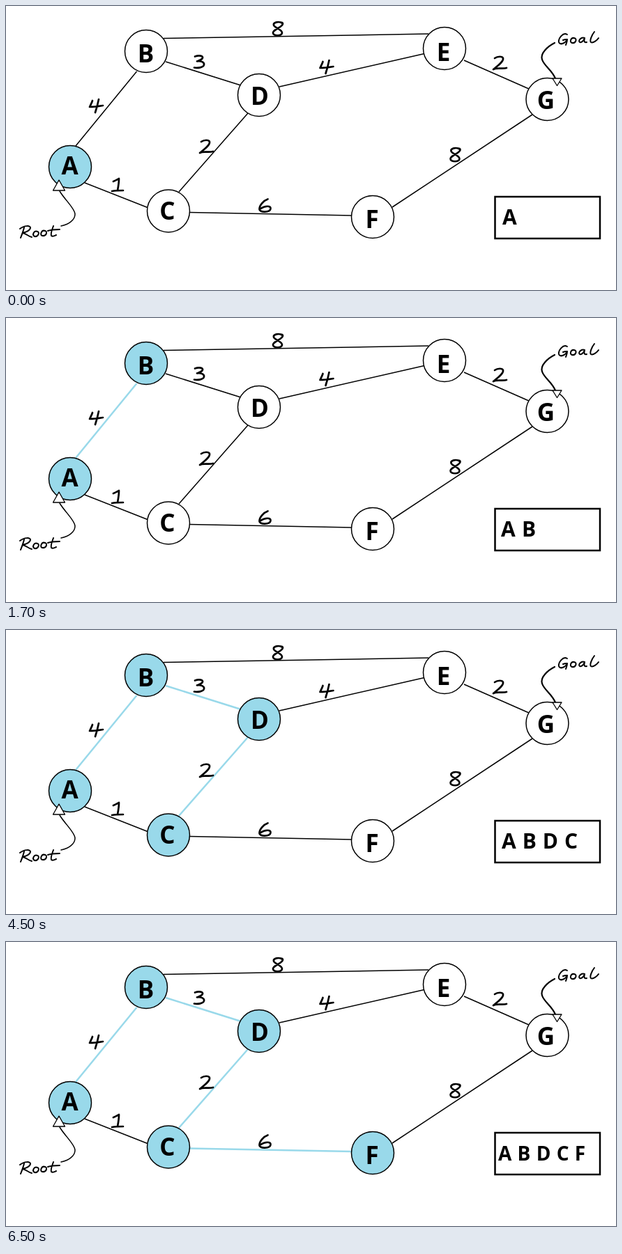
These frames come from a looping animation (875x408 px, 8 s). An HTML page:

```html
<!DOCTYPE html>
<html lang="en">
<head>
<meta charset="utf-8">
<title>Graph search</title>
<style>
  html, body { margin: 0; width: 100%; height: 100%; overflow: hidden; background: #fff; }
  svg { display: block; width: 100%; height: 100%; }
  text { font-family: "Open Sans", "Noto Sans", sans-serif; font-weight: 700; white-space: pre; }
  .ink { fill: none; stroke: #000; stroke-linecap: round; stroke-linejoin: round; }
</style>
</head>
<body>
<svg id="stage" viewBox="0 0 875 408"></svg>
<script>
const BLUE = '#99d9ea';
const LOOP = 8000;
const stage = document.getElementById('stage');

function add(tag, attrs, text) {
  const el = document.createElementNS('http://www.w3.org/2000/svg', tag);
  for (const key in attrs) el.setAttribute(key, attrs[key]);
  if (text) el.textContent = text;
  return stage.appendChild(el);
}

// Circle centre, then letter centre.
const nodes = {
  A: [92, 231, 91.5, 229], B: [201, 65, 200.5, 68], C: [233, 294.5, 231.5, 294.5],
  D: [363, 128, 364, 129], E: [629, 61, 627.5, 66], F: [526, 303, 525, 306],
  G: [776.5, 134, 774.5, 135]
};

// Line ends, then the weight and its centre.
const edges = {
  AB: [100, 201, 187.5, 94, 4, 129, 143],
  BE: [226, 46.5, 606, 40, 8, 390, 32.5],
  BD: [229, 80, 337, 114, 3, 277, 80.5],
  DE: [392, 116, 600, 68.5, 4, 459.5, 87],
  EG: [657, 78, 750, 119, 2, 708, 82],
  DC: [347, 154, 248, 267, 2, 287, 202],
  AC: [113, 254, 203, 289.5, 1, 160, 257],
  CF: [263, 296.5, 497, 301, 6, 371.5, 286.5],
  FG: [554, 289, 755, 156, 8, 644.5, 213.5]
};

// Handwritten digits around their own centre.
const digits = {
  1: 'M-6-5C-3-6 0-8 2-9C2-3 1 3 0 8M-8 9C-3 8 4 8 8 8',
  2: 'M-7-7C-3-10 4-10 5-7C6-2-4 5-9 9C-4 6 4 9 10 7',
  3: 'M-6-8C0-10 6-9 5-6C4-3-1-2-3-1C2-2 8 0 7 4C6 8-2 9-7 8',
  4: 'M-5-7C-6-4-8 0-9 2C-3 2 4 1 10 0M4-9C3-4 1 4-1 10',
  6: 'M4-9C-2-7-8 0-8 5C-8 11 7 10 8 5C9 0 0 0-7 5',
  8: 'M6-8C1-11-7-9-6-5C-5-1 6 1 6 6C6 11-7 11-7 6C-7 1 7-2 7-7C7-9 5-9 4-9'
};

// Visited path, with the answer text's x, size and word spacing.
const steps = [
  { from: 0, path: 'A', x: 712, size: 30, gap: 0 },
  { from: 500, path: 'AB', x: 710, size: 30, gap: 1.4 },
  { from: 2500, path: 'ABD', x: 710, size: 30, gap: 1.4 },
  { from: 4500, path: 'ABDC', x: 711, size: 30, gap: 1.2 },
  { from: 6500, path: 'ABDCF', x: 706, size: 28, gap: 1 }
];

const ink = (d, width, extra) => add('path', { d, class: 'ink', 'stroke-width': width, ...extra });
const label = (x, y, size, text, anchor) =>
  add('text', { x, y, 'font-size': size, 'text-anchor': anchor }, text);

const lines = {}, discs = {};
for (const id in edges) {
  const [x1, y1, x2, y2, weight, x, y] = edges[id];
  lines[id] = add('line', { x1, y1, x2, y2 });
  ink(digits[weight], 2.7, { transform: `translate(${x} ${y})`, 'aria-label': weight });
}
for (const id in nodes) {
  const [cx, cy, x, y] = nodes[id];
  discs[id] = add('circle', { cx, cy, r: 30.5, stroke: '#000', 'stroke-width': 1.5 });
  label(x, y + 12.5, 35, id, 'middle');
}

ink('M77 266C84 278 99 291 99 299C99 308 89 314 79 316', 1.5);
ink('M76 250L67.5 265H84.5Z', 1.3, { style: 'fill:#fff' });
ink('M787 53C777 58 766 68 769 77C772 86 783 92 788 104', 2.2);
ink('M784 104H797L790.5 114.5Z', 1.3, { style: 'fill:#fff' });

ink('M26 318C25 323 23 328 21 333M20 320C26 315 36 315 35 319C34 323 28 325 24 326C29 327 32 331 37 332' +
  'M45 324C40 322 37 329 41 331C46 332 49 325 45 324' +
  'M56 323C51 321 48 329 52 330C58 331 60 324 56 323' +
  'M68 316C66 321 64 327 65 330C67 332 70 330 72 329M60 323C66 321 71 321 77 321',
  2, { 'aria-label': 'Root' });
ink('M805 41C799 37 792 47 793 52C795 57 803 53 805 48C803 48 801 48 799 49M805 48C805 51 804 53 803 56' +
  'M815 46C810 45 808 52 812 53C817 54 820 47 815 46' +
  'M830 46C825 44 820 50 823 52C826 53 829 49 830 46C829 50 829 53 833 52' +
  'M844 37C840 42 837 50 839 52C842 54 848 49 850 46',
  2, { 'aria-label': 'Goal' });

add('rect', { x: 701.5, y: 274, width: 150.5, height: 60, fill: 'none', stroke: '#000', 'stroke-width': 2.5 });
const answer = label(712, 314, 30, 'A', 'start');

function draw(time) {
  const { path, x, size, gap } = steps.filter(step => time >= step.from).pop();
  for (const id in lines) {
    const on = path.includes(id);
    lines[id].setAttribute('stroke', on ? BLUE : '#000');
    lines[id].setAttribute('stroke-width', on ? 2.5 : 1.5);
  }
  for (const id in discs) discs[id].setAttribute('fill', path.includes(id) ? BLUE : '#fff');
  answer.textContent = [...path].join(' ');
  answer.setAttribute('x', x);
  answer.setAttribute('font-size', size);
  answer.setAttribute('word-spacing', gap);
}

const start = performance.now();
function tick() {
  draw((performance.now() - start) % LOOP);
  requestAnimationFrame(tick);
}
tick();
</script>
</body>
</html>
```
